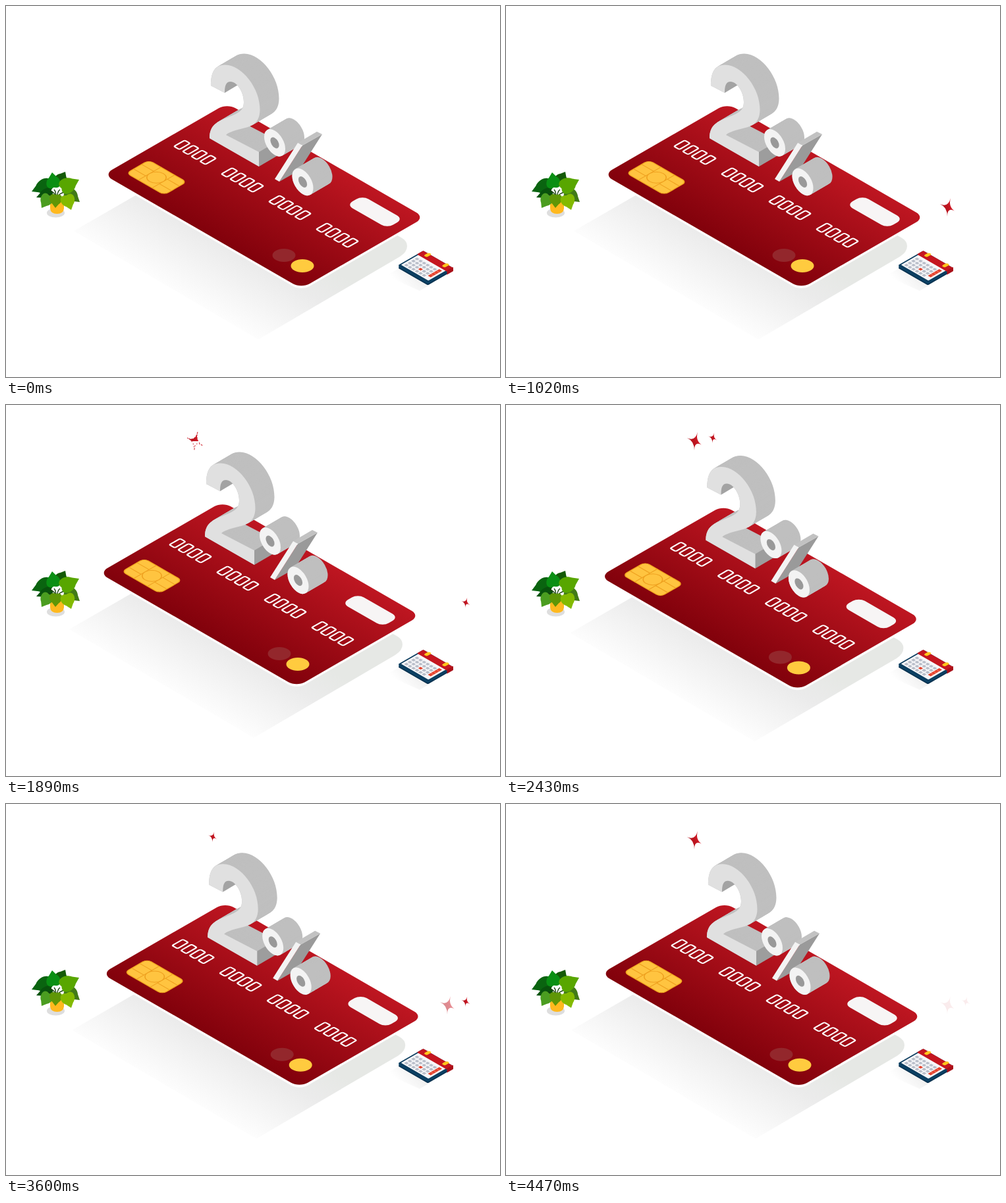
An HTML page for the animation above (4500 ms loop, 750 px wide and 564 px high).

```html
<!DOCTYPE html>
<html lang="en">
<head>
<meta charset="utf-8">
<title>Card offer</title>
<style>
  html, body { margin: 0; width: 100%; height: 100%; overflow: hidden; background: #fff; }
  svg { display: block; width: 100vw; height: 100vh; }
</style>
</head>
<body>
<svg id="stage" viewBox="0 0 750 564"></svg>
<script>
const LOOP = 4500, STEP = 30;
const stage = document.getElementById('stage');

// Isometric helpers: "floor" lies flat, "wall" stands upright.
const floor = (x, y, body) => `<g transform="matrix(.866 .5 -.866 .5 ${x} ${y})">${body}</g>`;
const wall = (x, y, body) => `<g transform="matrix(.866 .5 0 1 ${x} ${y})">${body}</g>`;
const path = (d, fill, more = '') => `<path d="${d}" fill="${fill}" ${more}/>`;
const rect = (x, y, w, h, r, fill, more = '') =>
  `<rect x="${x}" y="${y}" width="${w}" height="${h}" rx="${r}" fill="${fill}" ${more}/>`;
const slab = (a, b, r, fill, more) => rect(-a, -b, 2 * a, 2 * b, r, fill, more);
const range = (n, f) => Array.from({ length: n }, (_, i) => f(i)).join('');
const gradient = (id, x1, y1, x2, y2, stops) =>
  `<linearGradient id="${id}" gradientUnits="userSpaceOnUse" x1="${x1}" y1="${y1}" x2="${x2}" y2="${y2}">` +
  stops.map(([o, c]) => `<stop offset="${o}" stop-color="${c}"/>`).join('') + '</linearGradient>';

// Sweep a shape backwards to give it depth.
const DEPTH = 29;
const extrude = (shape) =>
  range(DEPTH + 1, i => `<g transform="translate(${DEPTH - i} ${(i - DEPTH) * 17 / DEPTH})">${shape}</g>`);

const STAR = 'M4-14Q0 0 12 7Q-1-2-1 14Q-1 0-12-5Q0 1 4-14Z';

const defs = `<defs>
  ${gradient('red', 51, -89, -52, 90, [[0, '#c11722'], [1, '#7e000a']])}
  ${gradient('shade', 505, 407, 431.5, 534, [[0, '#e6e8e5'], [.35, '#ebebeb'], [1, '#fdfdfd']])}
  ${gradient('haze', 622, 408, 600, 428, [[0, '#f1f1f1'], [1, '#ffffff']])}
  ${gradient('spark', -10, 4, 10, -2, [[0, '#b3121d'], [.5, '#bd1520'], [1, '#e3202d']])}
  <clipPath id="wipe"><rect id="wipeBox" x="-15" y="-15" width="30" height="0"/></clipPath>
</defs>`;

// Rounded isometric plate drawn in screen space, so gradients stay unskewed.
function plate(cx, cy, a, b, r, fill) {
  const at = (u, v) => `${((u - v) * .866).toFixed(2)} ${((u + v) / 2).toFixed(2)}`;
  const k = r * .448;
  const d = `M${at(r - a, -b)}L${at(a - r, -b)}C${at(a - k, -b)} ${at(a, k - b)} ${at(a, r - b)}` +
    `L${at(a, b - r)}C${at(a, b - k)} ${at(a - k, b)} ${at(a - r, b)}` +
    `L${at(r - a, b)}C${at(k - a, b)} ${at(-a, b - k)} ${at(-a, b - r)}` +
    `L${at(-a, r - b)}C${at(-a, k - b)} ${at(k - a, -b)} ${at(r - a, -b)}Z`;
  return `<g transform="translate(${cx} ${cy})">${path(d, fill)}</g>`;
}

function digits(k) {
  const cells = range(4, i => rect((i - 1.5) * 15.2 - 4.7, -9.4, 9.4, 18.8, 2.5, 'none', 'stroke="#fff" stroke-width="2.4"'));
  return floor(287 + 72 * k, 222.5 + 42 * k, cells);
}

function chip() {
  const lines = 'M-33-7H-12M12-7H33M-33 7H-12M12 7H33M-12-20V20M12-20V20';
  return floor(228.5, 260.8,
    slab(33, 19.6, 7, '#ffc440', 'stroke="#f3a71f" stroke-width="1.5"') +
    path(lines, 'none', 'stroke="#eea01f" stroke-width="1.3"') +
    '<circle r="12" fill="#ffc440" stroke="#eea01f" stroke-width="1.3"/>');
}

function two() {
  const d = 'M311 121C311 104 315 89 333 89.5C359 90 386 126 385.5 158C385 180 372 183 356 187' +
    'C345 190 338 192 334 196L384 222V244L309 201C309 184 317 177 335 170' +
    'C352 163 361 160 361 146C361 130 350 115 341 115C334 115 332 121 332 132Z';
  return extrude(path(d, '#bfbfbf')) +
    path('M332 132L357 117L346 104L332 110Z', '#a3a3a3') +
    path('M384 222V244L413 227V205Z', '#9d9d9d') +
    path(d, '#e0e0e0');
}

function ring(x, y) {
  const disc = (r, fill) => wall(x, y, `<circle r="${r}" fill="${fill}"/>`);
  return extrude(disc(18.5, '#bfbfbf')) + disc(18.5, '#f3f3f3') + disc(7.6, '#999');
}

const slash = path('M415 267L450 212L480 195L445 250Z', '#9a9a9a') +
  path('M443 208L472 191L480 195L450 212Z', '#c2c2c2') +
  path('M408 263L443 208L450 212L415 267Z', '#f3f3f3');

const card = `<g id="card">
  ${path('M200 286L103 342L383 507L598 381Q609 374 609 365Q609 357 600 352L560 330Z', 'url(#shade)')}
  ${plate(392, 292.5, 173.2, 108.2, 14.5, '#fff')}
  ${plate(392, 288.7, 173.2, 108.2, 14.5, 'url(#red)')}
  ${chip()}
  ${range(4, digits)}
  ${floor(560, 313, slab(35.7, 14, 10.5, '#f7f5f5'))}
  <ellipse cx="422" cy="379" rx="17.5" ry="10" fill="#93272c"/>
  <ellipse cx="450" cy="395" rx="17.5" ry="10" fill="#ffcb3f"/>
  ${two()}${ring(408, 208)}${slash}${ring(450.5, 267.5)}
</g>`;

// A leaf grows from (x, y) to its tip, w wide on each side.
function leaf(x, y, tx, ty, w, fill) {
  const dx = tx - x, dy = ty - y, n = Math.hypot(dx, dy), px = -dy / n * w, py = dx / n * w;
  const at = (f, s) => `${(x + dx * f + px * s).toFixed(1)} ${(y + dy * f + py * s).toFixed(1)}`;
  return path(`M${at(.05, 0)}C${at(-.15, 1.3)} ${at(.45, 1.6)} ${at(.72, .6)}L${at(1, 0)}L${at(.72, -.6)}C${at(.45, -1.6)} ${at(-.15, -1.3)} ${at(.05, 0)}Z`, fill);
}

const plant = '<ellipse cx="75.5" cy="314.5" rx="13.5" ry="7" fill="#dedede"/>' +
  path('M67 296V308Q68 316 77.5 316Q87 316 88 308V296Z', '#ffb91f') +
  [[80, 270, 90, 252, 8, '#145a08'], [69, 269, 39, 282, 9, '#0a6410'],
   [70, 281, 46, 291, 6, '#08520c'], [91, 281, 112, 298, 8, '#417a18']].map(a => leaf(...a)).join('') +
  path('M76 292Q74 282 66 281M76 292Q76 282 73 279M77 292Q78 282 82 279M78 292Q80 284 90 283M75 292Q70 286 63 286', 'none', 'stroke="#173f0c" stroke-width="1.4"') +
  [[73, 277, 70, 253, 9, '#0a8f14'], [83, 278, 111, 264, 10, '#58a600'],
   [66, 287, 54, 307, 8, '#4b9d20'], [76, 286, 75, 307, 8, '#5f9606'],
   [91, 287, 99, 310, 9, '#83ba00']].map(a => leaf(...a)).join('');

function calendar() {
  const cells = range(28, i => {
    const u = 5 + 6.2 * (i % 7), v = 16 + 6.2 * Math.floor(i / 7);
    const late = i % 7 === 6;
    return late ? '' : rect(u, v, 4.4, 4.2, 0, i === 17 ? '#e5422c' : '#b9bec9');
  });
  const ringAt = u => rect(u - 3, -2, 5.5, 9, 2.5, '#ffc51c');
  const base = (y, fill) => floor(633.5, y, rect(0, 0, 52.5, 44.5, 2, fill));
  return path('M600 397L577 410L628 433L650 420Z', 'url(#haze)') +
    base(376, '#06304f') + base(374, '#0b4468') + base(372, '#0c3d5f') +
    floor(633.5, 372, rect(2, 10, 48, 31, 1, '#f7f7f9') +
      cells + rect(42, 14, 5, 20, 0, '#e5422c') +
      path('M42 19H47M42 24H47M42 29H47', 'none', 'stroke="#f08a7a" stroke-width=".8"') +
      rect(0, 0, 52.5, 11, 1, '#c5161f') + ringAt(10.5) + ringAt(42)) +
    path('M669.5 402L679 397V403L669.5 408.5Z', '#a90f19');
}

const star = (id, x, y, s) =>
  `<g id="${id}" transform="translate(${x} ${y}) scale(${s})">${path(STAR, 'url(#spark)')}</g>`;
const wipedStar = `<g id="a" transform="translate(287 55)">
  ${path(STAR, 'none', 'id="dots" stroke="#d2303b" stroke-width="1.1" stroke-dasharray="1.6 2.6"')}
  <g clip-path="url(#wipe)">${path(STAR, 'url(#spark)')}</g></g>`;

stage.innerHTML = defs + card + plant + calendar() + wipedStar +
  star('b', 314, 50, .55) + star('c', 671, 306, 1) + star('d', 698, 300.5, .55);

// Drift of the card: time, x, y
const DRIFT = [
  [0, 0, 0], [400, .3, 1.5], [700, .2, 1.4], [1020, 0, 0], [1400, -3.8, -1], [1890, -7, -1],
  [2430, -5.6, 4.4], [2910, -2.2, 5.5], [3600, -2.8, 1.7], [3950, -4.4, 1.3], [4500, -4, 1.8]
];
// Each showing: rise start, rise end, fall start, fall end
const SHOWS = {
  a: [[1830, 1950, 2740, 2890], [3640, 3770, 9000, 9100]],
  b: [[2190, 2400, 3850, 4150]],
  c: [[700, 1000, 1150, 1500], [2770, 3030, 3450, 3750], [4440, 4800, 9000, 9100]],
  d: [[1200, 1500, 2190, 2400], [2790, 3060, 3850, 4150], [4440, 4800, 9000, 9100]]
};

const clamp = v => Math.max(0, Math.min(1, v));
const level = (id, t) => Math.max(...SHOWS[id].map(([r0, r1, f0, f1]) =>
  Math.min(clamp((t - r0) / (r1 - r0)), clamp((f1 - t) / (f1 - f0)))));

// Hermite curve through the drift keys
function drift(t, k) {
  const last = DRIFT.length - 1;
  let i = 0;
  while (i < last - 1 && t >= DRIFT[i + 1][0]) i++;
  const slope = j => {
    const p = DRIFT[Math.max(0, j - 1)], q = DRIFT[Math.min(last, j + 1)];
    return (q[k] - p[k]) / (q[0] - p[0]);
  };
  const p = DRIFT[i], q = DRIFT[i + 1], w = q[0] - p[0], s = (t - p[0]) / w;
  const ease = s * s * (3 - 2 * s);
  return p[k] + (q[k] - p[k]) * ease + w * s * (1 - s) * ((1 - s) * slope(i) - s * slope(i + 1));
}

const $ = id => document.getElementById(id);
const parts = { card: $('card'), a: $('a'), b: $('b'), c: $('c'), d: $('d'), dots: $('dots'), box: $('wipeBox') };

function draw(t) {
  parts.card.setAttribute('transform', `translate(${drift(t, 1).toFixed(2)} ${drift(t, 2).toFixed(2)})`);
  for (const id of 'bcd') parts[id].setAttribute('opacity', level(id, t));
  const a = level('a', t);
  parts.box.setAttribute('height', 30 * a);
  parts.dots.setAttribute('opacity', a > 0 && a < 1 ? 1 : 0);
}

const start = performance.now();
function tick() {
  const t = (performance.now() - start) % LOOP;
  draw(Math.floor(t / STEP) * STEP);
  requestAnimationFrame(tick);
}
draw(0);
requestAnimationFrame(tick);
</script>
</body>
</html>
```
